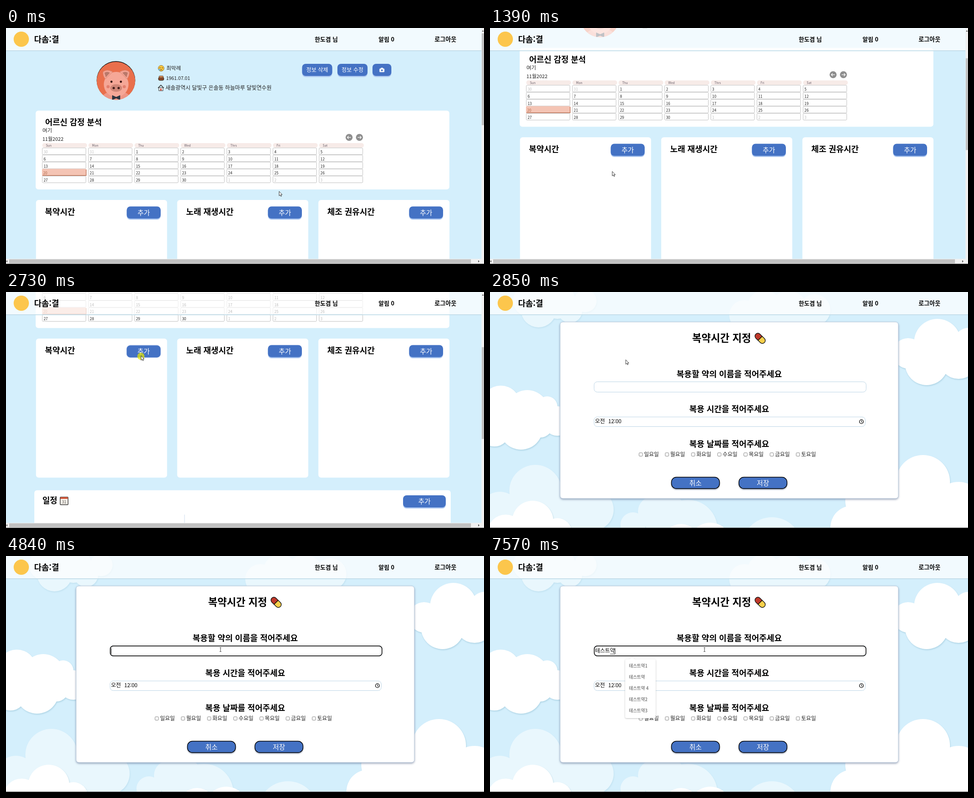
An HTML page for the animation above (8 s loop, 1063 by 527 pixels).

```html
<!DOCTYPE html>
<html lang="ko">
<head>
<meta charset="utf-8">
<style>
html, body { margin: 0; width: 100%; height: 100%; overflow: hidden; background: #d4effc; }
svg { display: block; width: 1063px; height: 527px; }
text { font-family: "Noto Sans CJK KR", "Noto Sans KR", "Noto Sans CJK", sans-serif; }
.card { fill: #fff; }
.cloud { fill: #fff; filter: drop-shadow(1px 2px 1.5px rgba(110, 165, 190, .35)); }
.modal { fill: #fff; stroke: #bccbdc; filter: drop-shadow(0 2px 2px rgba(60, 80, 120, .5)); }
.popup { fill: #fff; filter: drop-shadow(0 1px 1.5px rgba(0, 0, 0, .25)); }
.dark { filter: drop-shadow(0 2px 1px rgba(60, 80, 120, .45)); }
</style>
</head>
<body>
<svg id="stage" viewBox="0 0 1063 527">
  <g id="home"><g id="content"></g><g id="homeFrame"></g><g id="bar"></g></g>
  <g id="form"></g>
  <g id="live"></g>
</svg>
<script>
const $ = id => document.getElementById(id);
const LOOP = 8000, FORM_AT = 2850, BLUE = '#4472c4';

const text = (x, y, size, str, { fill = '#000', weight = 400, anchor = 'start', more = '' } = {}) =>
  `<text x="${x}" y="${y}" font-size="${size}" fill="${fill}" font-weight="${weight}" text-anchor="${anchor}" ${more}>${str}</text>`;
const rect = (x, y, w, h, r, fill, more = '') =>
  `<rect x="${x}" y="${y}" width="${w}" height="${h}" rx="${r}" fill="${fill}" ${more}/>`;
const circle = (x, y, r, fill, more = '') => `<circle cx="${x}" cy="${y}" r="${r}" fill="${fill}" ${more}/>`;
const path = (d, fill = 'none', more = '') => `<path d="${d}" fill="${fill}" ${more}/>`;
const group = (x, y, inner, more = '') => `<g transform="translate(${x} ${y})" ${more}>${inner}</g>`;
const bold = (x, y, size, str, anchor) => text(x, y, size, str, { weight: 700, anchor });
const card = (x, y, w, h) => `<rect class="card" x="${x}" y="${y}" width="${w}" height="${h}" rx="6"/>`;
const button = (x, y, w, label, size, h = 27) =>
  rect(x, y + 2.5, w, h, 8, '#abc6f0') + rect(x, y, w, h, 8, BLUE) +
  text(x + w / 2, y + h / 2 + size * .37, size, label, { fill: '#fff', anchor: 'middle' });

const header = width =>
  rect(0, 0, width, 50.5, 0, '#fff', 'opacity=".7"') +
  rect(0, 50, width, 1, 0, '#b9d6e4') + rect(0, 51, width, 1, 0, '#c8e4f0', 'opacity=".7"') +
  circle(34, 25, 17, '#fcc64c') +
  bold(62.5, 32, 18, '다솜:결') +
  bold(686.5, 30, 13, '한도겸 님') + bold(828.5, 30, 13, '알림 0') + bold(953, 30, 13.2, '로그아웃');

function avatar() {
  const ear = 'M216 98Q224 91 237 98L221 114Q215 106 216 98Z';
  const half = path(ear, '#f3a393', 'stroke="#d98b78"') + path('M219 100Q225 96 231 100L222 110Z', '#b9796a') +
    circle(234.5, 120, 2.4, '#3a1512') + circle(227, 131, 3.5, '#e27f6e');
  return '<clipPath id="round"><circle cx="244.5" cy="117.5" r="43"/></clipPath>' +
    circle(244.5, 117, 43, '#111') +
    `<g clip-path="url(#round)">` + circle(244.5, 118.5, 43, '#e96f4c') +
    '<ellipse cx="245" cy="160" rx="33" ry="20" fill="#ee9786"/>' +
    '<ellipse cx="245" cy="126" rx="27.5" ry="28" fill="#f5a797"/>' +
    half + `<g transform="matrix(-1 0 0 1 490 0)">${half}</g>` +
    '<ellipse cx="245" cy="134" rx="13" ry="8.5" fill="#cf8677"/>' +
    circle(239.5, 134, 2.6, '#431e1b') + circle(250.5, 134, 2.6, '#431e1b') +
    path('M236 150L245 154L254 150V161L245 157L236 161Z', '#2c3440') + '</g>';
}

function profileIcons() {
  const face = circle(345, 90, 6.5, '#fcc83f', 'stroke="#5b431c" stroke-width=".7"') +
    circle(342.5, 89, 1, '#432') + circle(347.5, 89, 1, '#432') +
    path('M342.5 94Q345 91.5 347.5 94', 'none', 'stroke="#432"') + circle(341, 93, 1.8, '#5ab4ee');
  const cake = rect(339, 110, 12, 7, 3, '#8a4a2a', 'stroke="#2b1a12"') + rect(340, 107, 10, 4, 2, '#d98f58', 'stroke="#2b1a12" stroke-width=".7"');
  const house = rect(340, 133, 9, 7, 0, '#fff', 'stroke="#222"') +
    path('M338 134L344.5 127.5L351 134', 'none', 'stroke="#222" stroke-width="1.3"') + rect(343, 135, 3, 5, 0, '#c94a3a');
  return face + cake + house;
}

function calendar() {
  let out = card(66, 184.5, 920, 176) + bold(87, 217, 18, '어르신 감정 분석') +
    text(81, 233, 11.6, '여기', { fill: '#222' }) + text(81, 252, 11, '11월2022', { fill: '#222' });
  [1, -1].forEach((dir, i) => out += group(763 + 23 * i, 244.3, circle(0, 0, 7.8, '#8e8e8e') +
    path(`M${4 * dir} 0H${-4 * dir}M${-dir} -3.2L${-4 * dir} 0L${-dir} 3.2`, 'none', 'stroke="#fff" stroke-width="1.3"')));
  ['Sun', 'Mon', 'Thu', 'Wed', 'Thrs', 'Fri', 'Sat'].forEach((day, col) => {
    const x = 80.7 + col * 102.6;
    out += rect(x, 257, 99.5, 10, 5, '#f7ebe8') + text(x + 8, 264.6, 7, day, { fill: '#665c66', weight: 500 });
    for (let row = 0; row < 5; row++) {
      const n = row * 7 + col - 1, y = 267.8 + row * 15.7, today = n === 20;
      const number = n < 1 ? n + 31 : n > 30 ? n - 30 : n;
      out += today
        ? rect(x - .7, y - .3, 98.5, 15, 2, '#f4c4b4') + path(`M${x} ${y + 14.5}H${x + 97.6}V${y + 1}`, 'none', 'stroke="#b86a4c" stroke-width="1.2"')
        : rect(x, y, 97, 15, 2, '#fff', 'stroke="#b8b8b8" stroke-width=".9"');
      out += text(x + (today ? 2 : 3), y + 12.3, 8.3, number,
        { fill: today ? '#b06a4a' : n < 1 || n > 30 ? '#bdbdbd' : '#222' });
    }
  });
  return out;
}

function homeContent() {
  const camera = rect(830.5, 90.5, 11, 8, 1.5, '#fff') + rect(833.5, 88.8, 5, 3, 1, '#fff') + circle(836, 94.5, 2, BLUE);
  let out = avatar() + profileIcons() +
    text(356.5, 94, 11.8, '최막례', { fill: '#222' }) + text(356, 116, 10.7, '1961.07.01', { fill: '#222' }) +
    text(354.5, 138, 12.1, '새솔광역시 달빛구 은솔동 하늘마루 달빛연수원', { fill: '#222' }) +
    button(658.5, 80, 67, '정보 삭제', 12.3) + button(737, 80, 67, '정보 수정', 12.3) + button(815, 80, 42, '', 12) + camera +
    calendar();
  ['복약시간', '노래 재생시간', '체조 권유시간'].forEach((title, i) => {
    const x = 67 + 314 * i;
    out += card(x - .3, 384, 291.5, 310.5) + bold(x + 19.5, 416.5, 18.2, title) + button(x + 201.5, 398.5, 75.5, '추가', 15);
  });
  return out + card(63, 722.7, 926, 500) + bold(81, 752, 18, '일정') + button(883, 734, 95, '추가', 15) +
    rect(120.5, 738, 17.5, 17, 1, '#f6f1ea', 'stroke="#333" stroke-width="1.4"') + rect(121, 738, 16.5, 4, 0, '#d0583c') +
    text(129.3, 752, 9, '31', { fill: '#555', anchor: 'middle' }) + rect(396.5, 777, 1, 80, 0, '#cddcf0');
}

const scrollbars = () =>
  rect(1057.5, 0, 5.5, 527, 0, '#f1f1f1') + path('M1058.5 8L1060.5 5L1062.5 8Z', '#505050') +
  rect(0, 515.5, 1063, 11, 0, '#f1f1f1') + rect(7, 516.5, 1027, 9, 0, '#c1c1c1') +
  path('M3 518.5V523.5L0.5 521ZM1050 518.5V523.5L1053 521Z', '#505050') + rect(0, 526, 1063, 1, 0, '#777');

// Each puff is [x, y, radius].
const cloud = (opacity, ...puffs) =>
  `<g opacity="${opacity}"><g class="cloud">${puffs.map(([x, y, r]) => circle(x, y, r, '#fff')).join('')}</g></g>`;

const sky = () => rect(0, 0, 1063, 527, 0, '#d4effc') +
  cloud(.5, [108, 40, 39], [178, 42, 27], [212, 20, 25], [85, 20, 34], [150, 20, 40]) +
  cloud(.5, [566, 52, 34], [610, 34, 38], [664, 42, 44], [722, 40, 35], [625, 62, 40]) +
  cloud(1, [24, 253, 44], [83, 267, 48], [127, 256, 23], [10, 311, 34], [69, 304, 48], [112, 298, 27], [150, 288, 33]) +
  cloud(1, [995, 112, 52], [1064, 112, 32], [930, 137, 34], [971, 160, 48], [1042, 150, 44]) +
  cloud(.5, [101, 444, 58], [22, 492, 46], [228, 486, 47], [150, 500, 60]) +
  cloud(.5, [318, 520, 28], [362, 490, 33], [440, 530, 66], [390, 500, 50], [627, 570, 67]) +
  cloud(1, [95, 512, 46], [35, 538, 41], [150, 537, 32]) +
  cloud(1, [490, 562, 47], [425, 560, 42]) +
  cloud(1, [963, 424, 60], [1042, 482, 58], [848, 466, 58], [806, 526, 49], [900, 500, 70], [980, 500, 70]);

function formPage() {
  const pill = '<g transform="translate(600.7 103.5) rotate(45)" stroke="#111" stroke-width="1.4">' +
    path('M0 -6.5H-7A6.5 6.5 0 0 0 -7 6.5H0Z', '#c0392b') + path('M0 -6.5H7A6.5 6.5 0 0 1 7 6.5H0Z', '#f8cf4b') + '</g>';
  const line = 'stroke="#bcd5e6"';
  let out = sky() + header(1063) + '<rect class="modal" x="156" y="67" width="752" height="394" rx="6"/>' +
    bold(449.5, 111, 22.6, '복약시간 지정') + pill +
    bold(532, 190, 18.3, '복용할 약의 이름을 적어주세요', 'middle') +
    bold(532, 268, 18.2, '복용 시간을 적어주세요', 'middle') +
    bold(532, 345.5, 18.2, '복용 날짜를 적어주세요', 'middle') +
    rect(231.5, 200.5, 605, 23, 7, '#fff', line) + rect(231.5, 279, 603, 21.5, 7, '#fff', line) +
    text(233.5, 293.3, 12, '오전', { weight: 300 }) + text(263, 293.3, 11.7, '12:00', { weight: 300 }) +
    circle(826, 289.5, 4.4, 'none', 'stroke="#111" stroke-width="1.4"') +
    path('M826 286.5V289.7L828 291', 'none', 'stroke="#111" stroke-width="1.1"');
  [...'일월화수목금토'].forEach((day, i) => {
    const x = 331.5 + 58.25 * i;
    out += rect(x, 359, 7.6, 7.6, 1.5, '#fff', 'stroke="#767676" stroke-width=".9"') + text(x + 11, 367, 12, day + '요일', { fill: '#222' });
  });
  [['취소', 403.5], ['저장', 553.5]].forEach(([label, x]) =>
    out += rect(x, 413.5, 107, 25.5, 11, BLUE, 'class="dark" stroke="#000" stroke-width="1.4"') +
      text(x + 53.5, 431.5, 15, label, { fill: '#fff', anchor: 'middle' }));
  return out + rect(0, 526, 1063, 1, 0, '#555');
}

const clamp01 = v => Math.min(1, Math.max(0, v));
const ramp = (t, from, to) => clamp01((t - from) / (to - from));
const ease = v => v * v * (3 - 2 * v);
const between = (t, from, to) => t >= from && t < to;

const route = [
  [330, 607, 364.5], [700, 430, 396], [1120, 226, 416], [1190, 234, 400], [1390, 271.5, 320], [1980, 288, 268],
  [2300, 296, 190], [2600, 300, 142], [2730, 300, 142], [2850, 301.5, 151], [2920, 301.5, 152],
  [3130, 279, 230], [3360, 326, 300], [3710, 477, 209]
];
function pointer(t) {
  const i = route.findIndex(stop => t < stop[0]);
  if (i < 1) return (i ? route[route.length - 1] : route[0]).slice(1);
  const [a, b] = [route[i - 1], route[i]], k = ease(ramp(t, a[0], b[0]));
  return [a[1] + (b[1] - a[1]) * k, a[2] + (b[2] - a[2]) * k];
}

const typing = [[5510, 'ㅌ'], [5710, '테'], [5780, '테ㅅ'], [5850, '테스'], [6110, '테슽'], [6310, '테스트'],
  [6780, '테스틍'], [6980, '테스트야'], [7190, '테스트약']];
const typed = t => typing.reduce((now, [at, str]) => t >= at ? str : now, '');

const matches = ['테스트약1', '테스트 수정', '테스트약', '테스트약 4', '테스트약2', '테스트약3'];
function popup(t) {
  const narrow = t >= 7190;
  const items = narrow ? matches.filter(item => item !== '테스트 수정') : matches;
  const opacity =
    t < 4840 ? ramp(t, 3920, 4150) * (1 - ramp(t, 4650, 4830)) :
    t < 6110 ? ramp(t, 5710, 5900) :
    t < 6780 ? (t < 6310 ? .9 - .4 * ramp(t, 6170, 6300) : 1) :
    narrow ? ramp(t, 7300, 7540) : 1 - ramp(t, 6780, 6960);
  if (!opacity) return '';
  const width = narrow ? 68 : t < 4840 ? 83 : 76;
  return `<g opacity="${opacity}"><g class="popup">` + rect(300.5, 230.5, width, items.length * 25 + 6.5, 3, '#fff') +
    path('M309.5 231L316 225L322.5 231Z', '#fff') + '</g>' +
    items.map((item, i) => text(309, 249 + 25 * i, 9.7, item, { fill: '#444' })).join('') + '</g>';
}

function nameField(t) {
  if (t < 3850) return '';
  const str = typed(t), end = 234 + str.length * 11;
  const caret = str || between(t, 3850, 4380) || between(t, 4700, 5380);
  return rect(231.8, 200.8, 604.4, 22.4, 7, '#fff', 'stroke="#111" stroke-width="1.7"') +
    text(233.7, 216.3, 12, str, { weight: 300 }) +
    (str ? rect(end - 11, 218.5, 11, .9, 0, '#222') : '') +
    (caret ? rect(end - .4, 206, 1, 13, 0, '#111') : '');
}

function cursor(t) {
  const [x, y] = pointer(t);
  const clicking = between(t, 2620, 2840) || between(t, 3780, 4050);
  const shape = t > 3640
    ? path('M-2 -4.5H-.6L0 -4L.6 -4.5H2M0 -4V4M-2 4.5H-.6L0 4L.6 4.5H2', 'none', 'stroke="#222" stroke-width=".9"')
    : path('M.4 .3V10.3L2.7 8.2L4.3 11.6L5.8 10.9L4.3 7.6H7.3Z', '#fff', 'stroke="#222" stroke-width=".9"');
  return group(x, y, (clicking ? circle(0, 1.5, 8, '#e6e600', 'opacity=".72"') : '') + shape);
}

// The hovered button sits flat, without its lower edge.
const pressed = y => rect(268, y, 76.5, 31, 0, '#fff') + rect(268.3, y + .7, 75.5, 27, 8, BLUE, 'stroke="#7d9fdd" stroke-width=".6"') +
  text(306, y + 19.6, 15, '추가', { fill: '#fff', anchor: 'middle' });

$('content').innerHTML = homeContent();
$('homeFrame').innerHTML = header(1057.5) + scrollbars();
$('form').innerHTML = formPage();

function draw(t) {
  const onForm = t >= FORM_AT;
  $('home').style.display = onForm ? 'none' : '';
  $('form').style.display = onForm ? '' : 'none';
  const scroll = 140 * (ease(ramp(t, 1190, 1370)) + ease(ramp(t, 2050, 2230)));
  $('content').setAttribute('transform', `translate(0 ${-scroll})`);
  $('bar').innerHTML = rect(1058, 12 + scroll * .397, 5, 205, 0, '#c1c1c1');
  $('live').innerHTML = (onForm ? nameField(t) + popup(t) : t > 2560 ? pressed(398.5 - scroll) : '') + cursor(t);
}

const start = performance.now();
function tick() {
  draw((performance.now() - start) % LOOP);
  requestAnimationFrame(tick);
}
tick();
</script>
</body>
</html>
```
